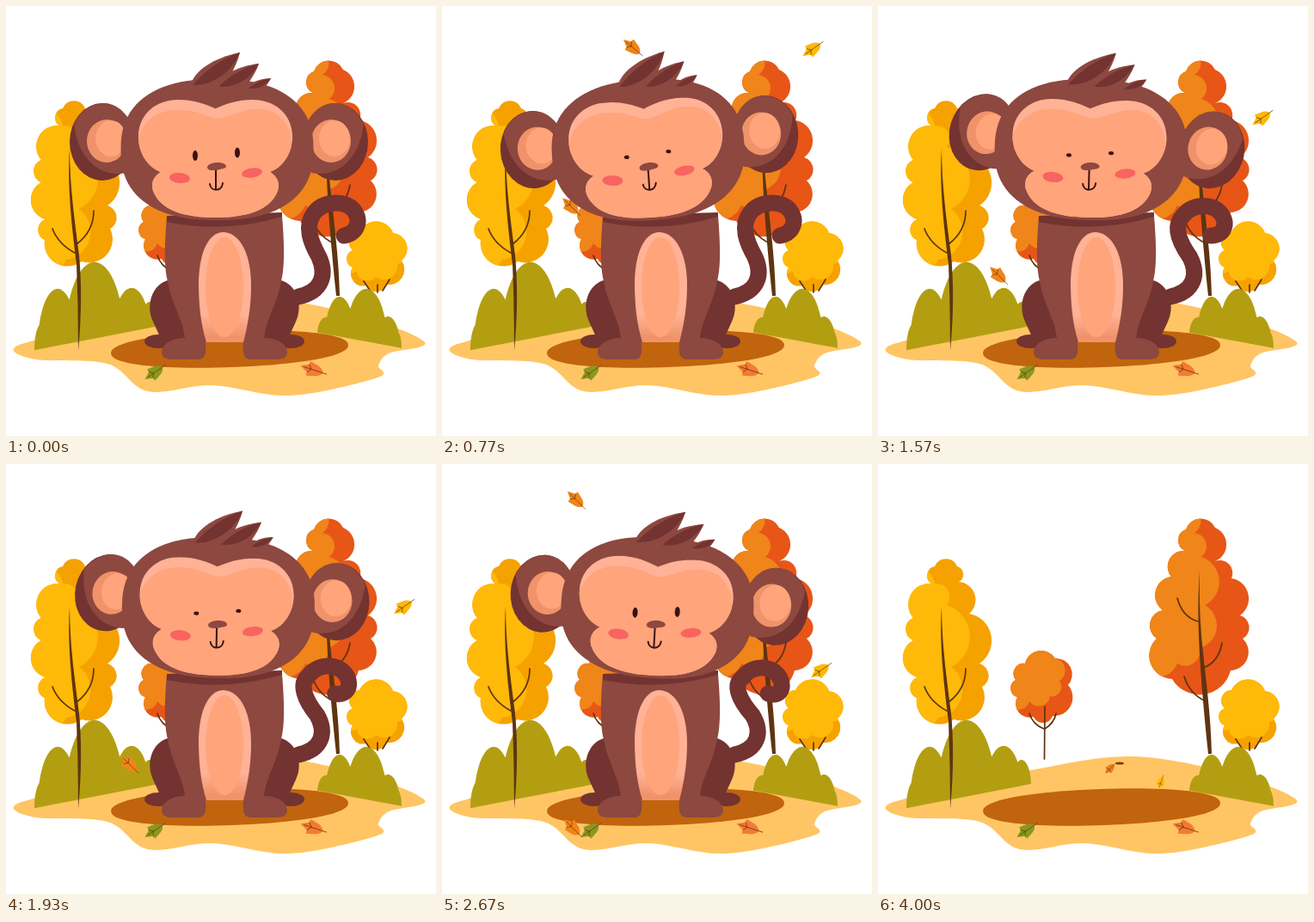
These frames come from a looping animation (500 px wide and 500 px high, 4030 ms). An HTML page:

```html
<!DOCTYPE html>
<html lang="en">
<head>
<meta charset="utf-8">
<title>Autumn monkey</title>
<style>
html, body { margin: 0; width: 100%; height: 100%; overflow: hidden; background: #fff; }
svg { display: block; width: 100vw; height: 100vh; }
.fur { fill: #8d4840; }
.shade { fill: #733330; }
.skin { fill: #ffa47b; }
.glow { fill: #ffb295; }
.tan { fill: #f0936a; }
.ink { fill: #3a1212; }
.cheek { fill: #f8645f; }
.yellow { fill: #ffb908; }
.gold { fill: #f5a200; }
.orange { fill: #f08519; }
.red { fill: #e75617; }
.green { fill: #b39e12; }
.bark { fill: #5f3410; }
.twig { fill: none; stroke: #5f3410; stroke-width: 1.7; stroke-linecap: round; }
.vein { fill: none; stroke: #6b3a10; stroke-width: .7; stroke-linecap: round; }
.mouth { fill: none; stroke: #3a1212; stroke-width: 2; stroke-linecap: round; }
</style>
</head>
<body>
<svg viewBox="0 0 500 500">
<defs>
  <g id="leaf">
    <path d="M-14 0L-6 -4L-5 -8L3 -6C8 -5 10 -2 11 0C10 2 8 5 3 6L-5 8L-6 4Z"/>
    <path class="vein" d="M-10 0H15M-2 0L-5 -4M-2 0L-5 4"/>
  </g>
  <path id="halfFace" d="M245 120C232 114 218 109 200 109C175 109 155 125 154 150C153 170 165 188 180 193C172 198 168 205 171 215C180 238 207 246 245 246Z"/>
  <clipPath id="faceClip">
    <use href="#halfFace"/>
    <use href="#halfFace" transform="translate(487 0) scale(-1 1)"/>
  </clipPath>
  <linearGradient id="bellyTone" x2="0" y2="1">
    <stop offset=".75" stop-color="#ffb295"/>
    <stop offset=".95" stop-color="#f0936a"/>
  </linearGradient>
  <g id="ear">
    <ellipse class="shade" cx="112" cy="158" rx="38" ry="45"/>
    <path class="fur" d="M79 138C86 122 99 113 114 113C133 114 147 130 151 158L140 194C118 199 86 188 79 138Z"/>
    <ellipse class="tan" cx="117" cy="157" rx="23" ry="25"/>
  </g>
  <g id="thigh">
    <ellipse class="shade" cx="177" cy="390" rx="16" ry="8"/>
    <path class="shade" d="M188 319C170 324 162 348 171 367L182 391H254V319Z"/>
  </g>
  <path id="arm" class="fur" d="M255 244H187C184 280 184 305 188 320C192 345 206 365 208 386C195 386 182 392 181 402C181 409 186 411 194 411H224C232 410 233 404 232 391H255Z"/>
</defs>

<path fill="#ffc564" data-spline="10,397 70,380 178,356 295,340 410,360 487,391 445,404 433,418 432,432 330,453 240,441 165,448 118,416 35,411"/>
<path fill="#c1640e" data-oval="260,399,138,21,2.2" transform="rotate(-2 260 399)"/>

<g>
  <clipPath id="c1"><path id="t1" data-cloud="171,232 206,226 221,257 203,293 181,294 162,271 160,251"/></clipPath>
  <use href="#t1" class="red"/>
  <path class="orange" clip-path="url(#c1)" data-cloud="204,215 206,226 211,252 200,270 176,276 150,278 150,215"/>
  <path class="twig" d="M194 282L193.500 343M176 290Q180 303 193 308M207 290Q205 301 194 308"/>
</g>
<g>
  <clipPath id="c2"><path id="t2" data-cloud="357,101 358,76 392,74 392,113 411,133 421,176 424,203 410,240 342,250 324,203 331,170 341,131"/></clipPath>
  <use href="#t2" class="red"/>
  <path class="orange" clip-path="url(#c2)" data-cloud="362,50 368,80 376,108 380,164 374,214 348,232 300,232 300,50"/>
  <path class="bark" d="M374 124C370 180 374 240 384 337H388C387 290 381 250 376 200Q373 160 374 124Z"/>
  <path class="twig" d="M348 156Q354 178 372 183M400 208Q396 231 378 237M356 247Q362 267 381 276"/>
</g>
<g id="yellowFall"></g>
<g>
  <clipPath id="c3"><path id="t3" data-cloud="411,263 450,264 460,296 442,324 419,325 403,304 403,284"/></clipPath>
  <use href="#t3" class="gold"/>
  <path class="yellow" clip-path="url(#c3)" data-cloud="463,255 455,300 430,315 408,308 390,300 390,250"/>
  <path class="twig" d="M416 320L424 332M432 324V333M446 318L438 331"/>
  <path class="green" data-domes="364,380,.184 372,10,362 388,17,338 419,24,329 444,14,361 453,7,377"/>
</g>
<g>
  <path class="green" data-domes="44,398,-.194 43,10,368 60,23,329 103,34,298 146,21,328 167,11,344"/>
  <clipPath id="c4"><path id="t4" data-cloud="62,139 66,119 92,119 94,137 106,174 118,232 121,259 88,297 45,272 46,248 41,205 41,179"/></clipPath>
  <use href="#t4" class="gold"/>
  <path class="yellow" clip-path="url(#c4)" data-cloud="66,139 80,164 85,236 70,295 10,290 10,130"/>
  <path class="bark" d="M74 166C71 210 77 260 82 300Q84 350 84 401C88 360 88 320 85 290C80 250 74 210 74 166Z"/>
  <path class="twig" d="M54 259Q61 277 80 287M102 238Q102 262 82 277"/>
</g>

<use href="#leaf" fill="#8a981f" transform="translate(173 426) rotate(-35)"/>
<use href="#leaf" fill="#f47a34" transform="translate(357 423) rotate(18) scale(1.100)"/>
<use href="#leaf" fill="#ec7a1e" transform="translate(270 354) rotate(-45) scale(.6)"/>
<ellipse cx="281" cy="348" rx="5" ry="1.600" fill="#7d3b10"/>
<use href="#leaf" fill="#ffb908" transform="translate(329 370) rotate(-70) scale(.6)"/>

<g id="orangeFall"></g>

<g id="monkey">
  <path id="tail" fill="none" stroke="#733330" stroke-width="19" stroke-linecap="round"/>
  <use href="#thigh"/>
  <use href="#thigh" transform="translate(508 0) scale(-1 1)"/>
  <use href="#arm"/>
  <use href="#arm" transform="translate(508 0) scale(-1 1)"/>
  <path fill="url(#bellyTone)" d="M224 320C225 285 236 263 253 263C273 264 285 290 285 325C285 350 281 372 276 391H233C227 372 224 350 224 320Z"/>
  <ellipse class="skin" cx="254" cy="327" rx="22" ry="58"/>
  <path class="shade" d="M187 244V251Q254 265 321 245V240Z"/>

  <g id="head">
    <g id="earL">
      <use href="#ear"/>
      <ellipse class="skin" cx="122" cy="154" rx="18" ry="21"/>
    </g>
    <g id="earR">
      <use href="#ear" transform="translate(495 0) scale(-1 1)"/>
      <ellipse class="skin" cx="382" cy="154" rx="18" ry="21"/>
    </g>
    <path class="fur" data-oval="245.500,167,112,82,2.4"/>
    <g id="hair"></g>
    <g clip-path="url(#faceClip)">
      <path class="glow" d="M140 100H350V250H140Z"/>
      <path class="skin" d="M155 152C160 132 180 119 205 121C225 122 235 130 246 131C262 130 275 118 298 120C318 122 328 138 331 150L340 260H150V160Z"/>
    </g>
    <ellipse class="cheek" cx="202" cy="200" rx="12" ry="6" transform="rotate(5 202 200)"/>
    <ellipse class="cheek" cx="286" cy="194" rx="12" ry="5.500" transform="rotate(-8 286 194)"/>
    <ellipse id="eyeL" class="ink" cx="220" cy="174" rx="3"/>
    <ellipse id="eyeR" class="ink" cx="269" cy="170.500" rx="3"/>
    <path class="mouth" d="M244 189V212M237 207C238 216 251 216 252 206"/>
    <path class="fur" d="M234 187C236 181 254 180 256 186C256 190 249 189 245 191C241 191 234 192 234 187Z"/>
  </g>
</g>
</svg>

<script>
const LOOP = 4030, CUT = 4000;
const $ = id => document.getElementById(id);
const wave = (t, period) => Math.sin(2 * Math.PI * t / period);
const parse = text => text.split(" ").map(p => p.split(",").map(Number));

// Rises from 0 to 1 and falls back between two times.
function swell(t, from, to) {
  const k = Math.min(1, Math.max(0, (t - from) / (to - from)));
  return Math.sin(Math.PI * k) ** 2;
}

const shapes = {
  // Notches joined by round bulges.
  cloud(text) {
    const pts = parse(text);
    return pts.map(([x, y], i) => {
      const [u, v] = pts[(i + 1) % pts.length];
      const r = Math.hypot(u - x, v - y) * .54;
      return `${i ? "" : `M${x} ${y}`}A${r} ${r} 0 0 1 ${u} ${v}`;
    }).join("") + "Z";
  },
  // Half ellipses standing on a sloping line.
  domes(text) {
    const [[x0, y0, slope], ...tops] = parse(text);
    const base = x => y0 + slope * (x - x0);
    return tops.map(([x, r, top]) =>
      `M${x - r} ${base(x - r)}A${r} ${base(x) - top} 0 0 1 ${x + r} ${base(x + r)}Z`).join("");
  },
  // Smooth closed curve through the points.
  spline(text) {
    const pts = parse(text), n = pts.length;
    const at = i => pts[(i + n) % n];
    return `M${pts[0]}` + pts.map((p, i) => {
      const q = at(i + 1), before = at(i - 1), after = at(i + 2);
      const c = p.map((v, j) => v + (q[j] - before[j]) / 6);
      const d = q.map((v, j) => v - (after[j] - p[j]) / 6);
      return `C${c} ${d} ${q}`;
    }).join("") + "Z";
  },
  // Superellipse; the power sets how square it is.
  oval(text) {
    const [[cx, cy, rx, ry, power]] = parse(text);
    const bend = v => Math.sign(v) * Math.abs(v) ** (2 / power);
    const pts = Array.from({ length: 90 }, (_, i) => {
      const a = i * Math.PI / 45;
      return [cx + rx * bend(Math.cos(a)), cy + ry * bend(Math.sin(a))];
    });
    return `M${pts.join("L")}Z`;
  }
};

for (const kind in shapes)
  for (const el of document.querySelectorAll(`[data-${kind}]`))
    el.setAttribute("d", shapes[kind](el.dataset[kind]));

function tuft(x, y, tipX, tipY) {
  const size = Math.hypot(tipX - x, tipY - y) / 10;
  const turn = Math.atan2(tipY - y, tipX - x) * 180 / Math.PI;
  return `<g transform="translate(${x} ${y}) rotate(${turn}) scale(${size})">
    <path class="fur" d="M0 0C2 -1.900 6 -1.700 10 0C8 1.800 5 3 2 4Z"/>
    <path class="shade" d="M.5 0C4 -.9 7 -.8 10 0C7 2 3 1.900 .5 0Z"/></g>`;
}
$("hair").innerHTML = tuft(214, 94, 272, 54) + tuft(245, 95, 294, 67) + tuft(281, 96, 308, 84);

const leaves = [
  { home: "orangeFall", x: 146, start: -1560, sway: -6, shift: 1020, tilt: 45 },
  { home: "orangeFall", x: 225, start: 290, sway: 5, shift: 1020, tilt: 40 },
  { home: "orangeFall", x: 159, start: 2255, sway: 5, shift: 2900, tilt: 45 },
  { home: "yellowFall", x: 445, start: 270, sway: 19, shift: 1540, tilt: -35 }
];
for (const leaf of leaves) {
  leaf.el = document.createElementNS("http://www.w3.org/2000/svg", "use");
  leaf.el.setAttribute("href", "#leaf");
  leaf.el.setAttribute("class", leaf.home === "yellowFall" ? "yellow" : "orange");
  $(leaf.home).append(leaf.el);
}

// Head poses: time, degrees.
const poses = [[0, 0], [770, -3.8], [1270, 1.75], [1930, .9], [2670, 3.2], [CUT, 0]];

function headTurn(t) {
  const i = Math.max(1, poses.findIndex(p => p[0] >= t));
  const [t0, a] = poses[i - 1], [t1, b] = poses[i];
  return a + (b - a) * (1 - Math.cos(Math.PI * (t - t0) / (t1 - t0))) / 2;
}

// The curl tightens and leans left as k grows.
function tailPath(k) {
  const x = v => v - 9 * k, tip = v => v - 14 * k, y = v => v + 8 * k;
  return `M340 338C368 332 373 312 ${364 - 3 * k} 292
    C${x(354)} 274 ${x(347)} 256 ${x(358)} ${y(241)}
    C${x(368)} ${y(227)} ${tip(393)} ${y(225)} ${tip(404)} ${y(237)}
    C${tip(414)} ${y(250)} ${tip(408)} ${y(264)} ${tip(393)} 267`;
}

const spin = (id, deg, x, y) => $(id).setAttribute("transform", `rotate(${deg} ${x} ${y})`);

function draw(t) {
  const present = t < CUT;
  for (const id of ["monkey", "yellowFall", "orangeFall"])
    $(id).setAttribute("visibility", present ? "visible" : "hidden");
  if (!present) return;

  spin("head", headTurn(t), 245, 255);
  spin("earL", 16 * swell(t, 770, 2500), 145, 178);
  spin("earR", 16 * swell(t, 770, 1900), 350, 178);

  const open = 6 - 3.8 * Math.min(1, 5 * swell(t, 450, 2250));
  $("eyeL").setAttribute("ry", open);
  $("eyeR").setAttribute("ry", open);
  $("tail").setAttribute("d", tailPath(swell(t, 770, 4300)));

  for (const { el, x, start, sway, shift, tilt } of leaves) {
    const swing = wave(t - shift, 2100);
    el.setAttribute("transform", `translate(${x + sway * swing} ${(t - start) * .1}) rotate(${tilt})`);
  }
}

const begin = performance.now();
function tick() {
  draw((performance.now() - begin) % LOOP);
  requestAnimationFrame(tick);
}
tick();
</script>
</body>
</html>
```
